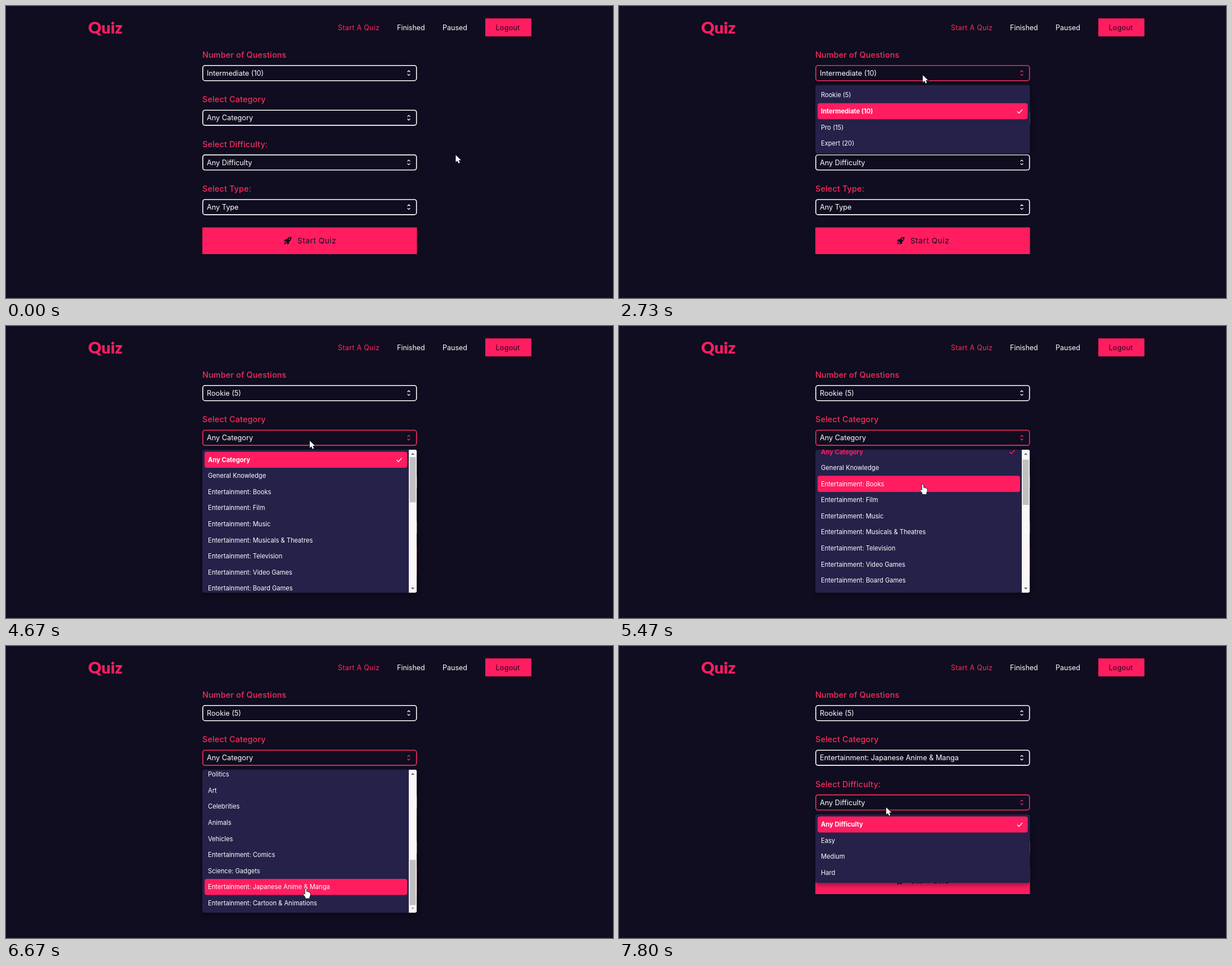
Animation, 1079 px wide and 519 px high, one loop 8 s. Source, as an HTML page with a canvas:

```html
<!DOCTYPE html>
<html lang="en">
<head>
<meta charset="utf-8">
<title>Quiz setup</title>
<style>
  html, body { margin: 0; width: 100%; height: 100%; overflow: hidden; background: #0f0d1f; }
  canvas { display: block; }
</style>
</head>
<body>
<canvas id="stage" width="1079" height="519"></canvas>
<script>
const ctx = document.getElementById('stage').getContext('2d');
const LOOP = 8000, FPS = 15;
const BG = '#0f0d1f', PINK = '#ff1d60', LABEL = '#fa2b5f', PANEL = '#252149', WHITE = '#fff';
const LEFT = 349, WIDTH = 381.5, PITCH = 79.4, ROW = 28.57, MENU_TOP = 140.4, MAX_SCROLL = 466.6;

const media = ['Books', 'Film', 'Music', 'Musicals & Theatres', 'Television', 'Video Games', 'Board Games'];
const categories = ['Any Category', 'General Knowledge', ...media.map(m => 'Entertainment: ' + m),
  'Science & Nature', 'Science: Computers', 'Science: Mathematics', 'Mythology', 'Sports', 'Geography',
  'History', 'Politics', 'Art', 'Celebrities', 'Animals', 'Vehicles', 'Entertainment: Comics',
  'Science: Gadgets', 'Entertainment: Japanese Anime & Manga', 'Entertainment: Cartoon & Animations'];

// Each select: opened at, picked at, index before and after the pick
const selects = [
  { label: 'Number of Questions', items: ['Rookie (5)', 'Intermediate (10)', 'Pro (15)', 'Expert (20)'],
    open: 2560, pick: 3930, from: 1, to: 0 },
  { label: 'Select Category', items: categories, open: 4590, pick: 6930, from: 0, to: 23, scrolls: true },
  { label: 'Select Difficulty:', items: ['Any Difficulty', 'Easy', 'Medium', 'Hard'],
    open: 7660, pick: Infinity, from: 0, to: 0 },
  { label: 'Select Type:', items: ['Any Type'], open: Infinity, pick: Infinity, from: 0, to: 0 }
];

const cursorPath = [[0, 799.5, 265], [867, 799.5, 265], [1067, 796, 266], [1200, 796, 266],
  [1600, 775, 251], [1867, 728.5, 221.5], [2067, 597, 178], [2533, 540, 123], [3333, 540, 123],
  [3600, 540, 153], [4400, 540, 153], [4600, 540, 204], [5200, 540, 204], [5467, 540, 281],
  [5600, 540, 384.5], [6333, 540, 384.5], [6667, 533, 431], [7067, 533, 431], [7667, 475, 287]];
const scrollPath = [[5400, 0], [5467, 13.6], [5533, 80], [5733, 237], [5933, 237],
  [6133, 425], [6200, 444.5], [6333, MAX_SCROLL]];

const arrow = new Path2D('M0 0V12.6L3 9.9L5 14.6L7.2 13.6L5.2 9.1H9.2Z');
const hand = new Path2D('M-1.3 1.5C-1.3-.2 1.1-.2 1.1 1.5V6C2 5.3 3.3 5.6 3.5 6.6C4.4 6 5.5 6.4 5.7 7.4C6.8 7 7.7 7.6 7.7 8.8V12.5L6.4 15.3V17.5H-.6V15.6L-4.1 11.2C-4.8 9.9-3.4 9-2.5 9.9L-1.3 11Z');
const rocket = new Path2D('M13.5 0C9 0 6.6 1.6 4.9 4.2L1.8 4.4L0 8L3 7.9L5.6 10.5L5.5 13.5L9.1 11.7L9.3 8.6C11.9 6.9 13.5 4.5 13.5 0ZM2.4 9.2C.9 9.8.6 11.4.4 13.1C2.1 12.9 3.7 12.6 4.3 11.1ZM9.9 2.3A1.3 1.3 0 1 1 9.8 2.3Z');

function track(keys, t) {
  const next = keys.findIndex(k => k[0] > t);
  if (next === 0) return keys[0].slice(1);
  if (next < 0) return keys[keys.length - 1].slice(1);
  const a = keys[next - 1], b = keys[next], p = (t - a[0]) / (b[0] - a[0]);
  return a.slice(1).map((v, i) => v + (b[i + 1] - v) * p);
}

function text(str, x, y, size, color = WHITE, weight = 400, spacing = 0, family = 'Inter') {
  ctx.font = `${weight} ${size}px ${family}, sans-serif`;
  ctx.letterSpacing = spacing + 'px';
  ctx.fillStyle = color;
  ctx.fillText(str, x, y);
}

function box(x, y, w, h, r, fill) {
  ctx.beginPath();
  ctx.roundRect(x, y, w, h, r);
  ctx.fillStyle = fill;
  ctx.fill();
}

function line(points, color, width = 1.4) {
  ctx.beginPath();
  points.forEach(([x, y]) => ctx.lineTo(x, y));
  ctx.strokeStyle = color;
  ctx.lineWidth = width;
  ctx.stroke();
}

function triangle(x, y, dir, color) {
  ctx.beginPath();
  ctx.moveTo(x - 3, y + 1.5 * dir);
  ctx.lineTo(x + 3, y + 1.5 * dir);
  ctx.lineTo(x, y - 1.5 * dir);
  ctx.fillStyle = color;
  ctx.fill();
}

function at(path, x, y, fill, stroke) {
  ctx.save();
  ctx.translate(x, y);
  ctx.fillStyle = fill;
  if (stroke) {
    ctx.strokeStyle = stroke;
    ctx.lineWidth = 1.6;
    ctx.stroke(path);
  }
  ctx.fill(path, 'evenodd');
  ctx.restore();
}

function drawPage() {
  ctx.fillStyle = BG;
  ctx.fillRect(0, 0, 1079, 519);
  text('Quiz', 146, 48.5, 29, PINK, 900, 0, 'Lato');
  text('Start A Quiz', 590, 43, 12.5, LABEL, 400, 0.3);
  text('Finished', 695, 43, 12.5);
  text('Paused', 776, 43, 12.5);
  box(852, 22, 82, 32, 1, PINK);
  text('Logout', 870.5, 43, 12.5, BG, 400, 0.3);
  box(LEFT, 393.5, WIDTH, 47.5, 1, PINK);
  at(rocket, 494, 410.5, BG);
  text('Start Quiz', 518, 422, 13.5, BG, 400, 0.6);
}

function drawSelect(s, i, t) {
  const y = 105 + i * PITCH;
  const later = selects[i + 1];
  const color = t >= s.open && !(later && t >= later.open) ? LABEL : WHITE;
  text(s.label, LEFT, y - 13, 14.3, LABEL, 500, 0.2);
  ctx.beginPath();
  ctx.roundRect(LEFT + 0.8, y + 0.8, WIDTH - 1.6, 26.9, 4);
  ctx.strokeStyle = color;
  ctx.lineWidth = 1.6;
  ctx.stroke();
  text(s.items[t >= s.pick ? s.to : s.from], 357, y + 18.7, 12.7);
  for (const d of [-1, 1])
    line([[713.6, y + 14.2 + 1.9 * d], [716, y + 14.2 + 4.2 * d], [718.4, y + 14.2 + 1.9 * d]], color, 1.3);
}

function drawMenu(s, i, t, pointerY) {
  const top = MENU_TOP + i * PITCH;
  const height = s.scrolls ? 254.2 : s.items.length * ROW + 7.6;
  const first = top + 3.7;
  const scroll = s.scrolls ? track(scrollPath, t)[0] : 0;
  const hoverScroll = s.scrolls ? track(scrollPath, t - 67)[0] : 0;
  const hovered = pointerY < first ? s.from : Math.floor((pointerY + hoverScroll - first) / ROW);
  const rowWidth = s.scrolls ? 360 : 373.5;

  ctx.save();
  ctx.globalAlpha = Math.min(1, (t - s.open + 60) / 130);
  ctx.save();
  ctx.shadowColor = 'rgba(0,0,0,.4)';
  ctx.shadowBlur = 10;
  ctx.shadowOffsetY = 4;
  box(LEFT, top, WIDTH, height, 4, PANEL);
  ctx.restore();
  ctx.beginPath();
  ctx.roundRect(LEFT, top, WIDTH, height, 4);
  ctx.clip();

  s.items.forEach((item, n) => {
    const y = first + n * ROW - scroll, mid = y + ROW / 2;
    if (y > top + height || y + ROW < top) return;
    const active = n === hovered, chosen = n === s.from;
    if (active) box(353, y, rowWidth, ROW, 4, PINK);
    const color = chosen && !active ? PINK : WHITE;
    text(item, 359, mid + 4, 11.15, color, chosen ? 700 : 400);
    const cx = 353 + rowWidth - 14;
    if (chosen) line([[cx - 4.5, mid + 0.5], [cx - 1.5, mid + 3.5], [cx + 4.5, mid - 3]], color);
  });

  if (s.scrolls) {
    box(716, top, 14, height, 0, '#fbf6f6');
    box(717.5, top + 13.2 + 147 * scroll / MAX_SCROLL, 11, 80.5, 0, '#c1bfc0');
    triangle(723, top + 7.5, 1, '#505050');
    triangle(723, top + height - 7.5, -1, scroll < MAX_SCROLL ? '#505050' : '#a8a5a5');
  }
  ctx.restore();
}

function draw(now) {
  const t = Math.floor((now % LOOP + 4) * FPS / 1000) * 1000 / FPS + 1;
  const [x, y] = track(cursorPath, t);
  drawPage();
  selects.forEach((s, i) => drawSelect(s, i, t));
  const openIndex = selects.findIndex(s => t >= s.open && t < s.pick);
  if (openIndex >= 0) drawMenu(selects[openIndex], openIndex, t, y);
  const overMenu = openIndex >= 0 && y > MENU_TOP + openIndex * PITCH;
  const overButton = y > 393 && y < 441;
  at(overMenu || overButton ? hand : arrow, x, y, WHITE, '#17151f');
  requestAnimationFrame(() => draw(performance.now()));
}
draw(0);
</script>
</body>
</html>
```
